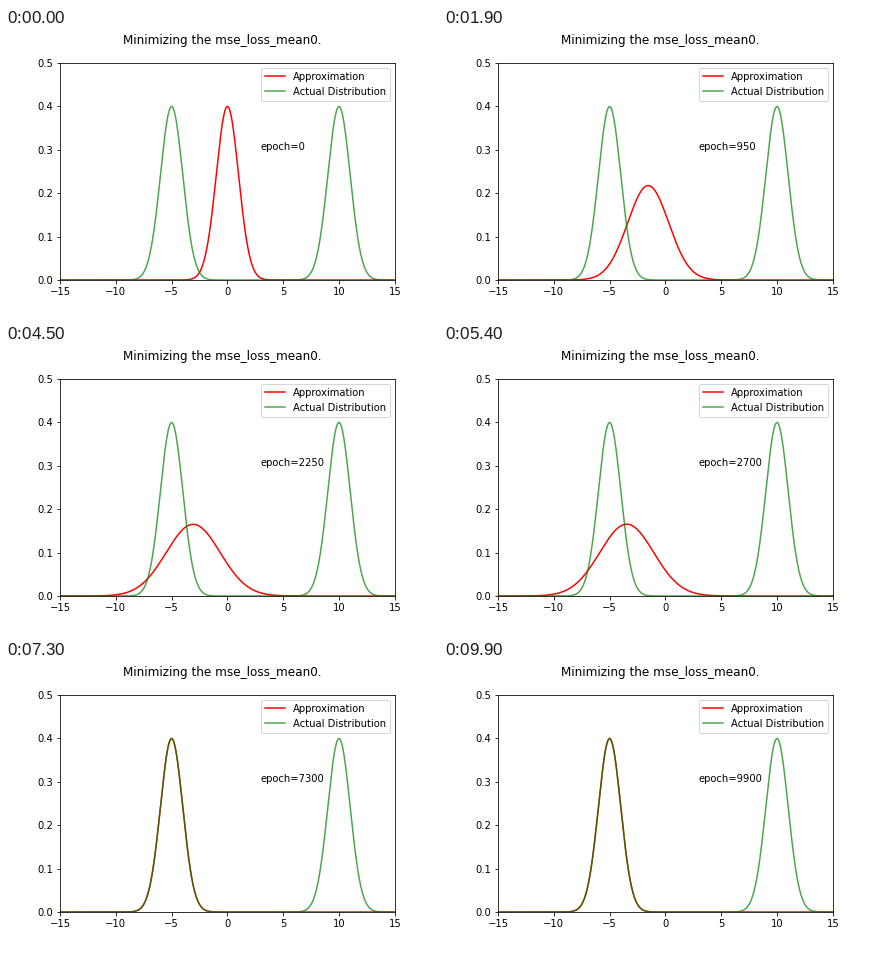
Recreate the animation shown at these times as a matplotlib script. Size 432 px wide and 288 px high, loop 10 s.

```python
import math

import matplotlib.pyplot as plt
import numpy as np
from matplotlib.animation import FuncAnimation

W, H, DPI = 432, 288, 72
FRAMES, INTERVAL = 100, 100
MODES = (-5, 10)
LR, B1, B2, EPS = 0.001, 0.9, 0.999, 1e-8


def normal(x, mu, sigma):
    return np.exp(-0.5 * ((x - mu) / sigma) ** 2) / (sigma * math.sqrt(2 * math.pi))


def gradient(mu, sigma):
    """Gradient of the integrated squared error, averaged over the 30 wide axis."""
    var = sigma ** 2 + 1
    g_mu = 0.0
    g_sigma = -1 / (2 * math.sqrt(math.pi) * sigma ** 2)
    for mode in MODES:
        d = mu - mode
        overlap = math.exp(-d * d / (2 * var)) / math.sqrt(2 * math.pi * var)
        g_mu += 2 * overlap * d / var
        g_sigma -= 2 * overlap * sigma * (d * d / var - 1) / var
    return g_mu / 30, g_sigma / 30


def train(epochs):
    """Adam descent from a unit normal; returns (mu, sigma) for each epoch."""
    params, m, v = [0.0, 1.0], [0.0, 0.0], [0.0, 0.0]
    path = [tuple(params)]
    for t in range(1, epochs + 1):
        for i, g in enumerate(gradient(*params)):
            m[i] = B1 * m[i] + (1 - B1) * g
            v[i] = B2 * v[i] + (1 - B2) * g * g
            m_hat = m[i] / (1 - B1 ** t)
            v_hat = v[i] / (1 - B2 ** t)
            params[i] -= LR * m_hat / (math.sqrt(v_hat) + EPS)
        path.append(tuple(params))
    return path


def epoch_at(frame):
    return frame * (50 if frame < 70 else 100)


path = train(epoch_at(FRAMES - 1))
x = np.linspace(-15, 15, 1000)

fig, ax = plt.subplots(figsize=(W / DPI, H / DPI), dpi=DPI)
fig.subplots_adjust(left=0.125, right=0.9, bottom=0.125, top=0.88)
fig.suptitle("Minimizing the mse_loss_mean0.", fontsize=12)

approx, = ax.plot(x, normal(x, 0, 1), color="red", label="Approximation")
ax.plot(x, sum(normal(x, mode, 1) for mode in MODES), color="green",
        alpha=0.7, label="Actual Distribution")
label = ax.text(3, 0.3, "epoch=0")
ax.set_xlim(-15, 15)
ax.set_ylim(0, 0.5)
ax.legend(loc="upper right")


def update(frame):
    epoch = epoch_at(frame)
    approx.set_ydata(normal(x, *path[epoch]))
    label.set_text(f"epoch={epoch}")
    return approx, label


anim = FuncAnimation(fig, update, frames=FRAMES, interval=INTERVAL,
                     repeat=True, repeat_delay=0)
plt.show()
```
